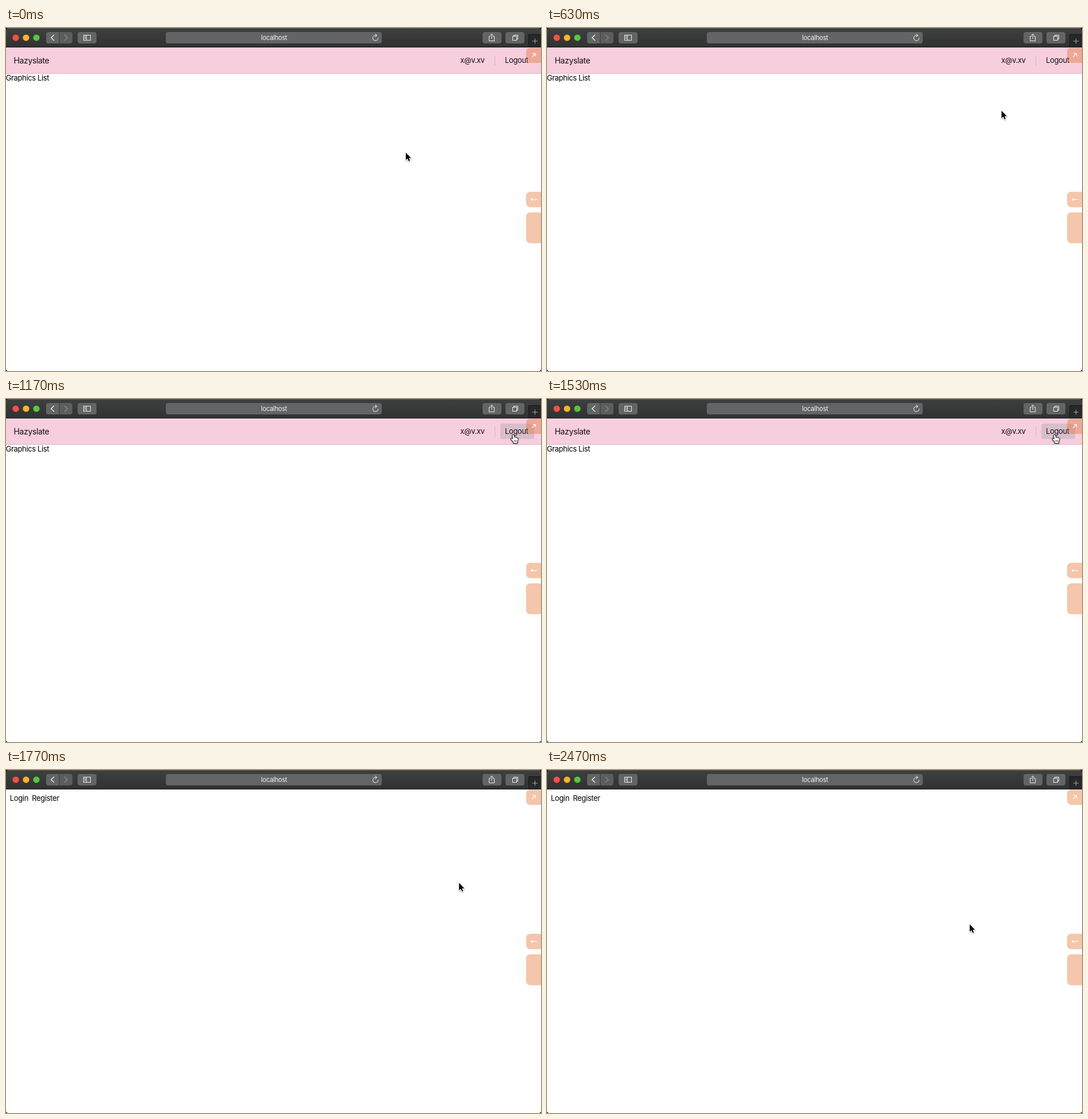
Write an HTML page with a canvas that moves like this. It is 934 px wide and 600 px high and loops after 2510 ms.

```html
<!DOCTYPE html>
<html lang="en">
<head>
<meta charset="utf-8">
<title>Logout</title>
<style>
  html, body { margin: 0; width: 100%; height: 100%; overflow: hidden; background: #fff; }
  canvas { display: block; }
</style>
</head>
<body>
<canvas id="stage" width="934" height="600"></canvas>
<script>
const ctx = document.getElementById('stage').getContext('2d');
const W = 934, H = 600, LOOP = 2510, LOGOUT_AT = 1570, LEAVE_AT = 1600;
const FONT = 'Inter, "Liberation Sans", sans-serif';

function box(x, y, w, h, r, fill) {
  ctx.beginPath();
  ctx.roundRect(x, y, w, h, r);
  ctx.fillStyle = fill;
  ctx.fill();
}

function line(points, color, width = 1) {
  ctx.beginPath();
  points.forEach(([x, y]) => ctx.lineTo(x, y));
  ctx.strokeStyle = color;
  ctx.lineWidth = width;
  ctx.stroke();
}

function frameRect(x, y, w, h, color) {
  ctx.strokeStyle = color;
  ctx.lineWidth = 1;
  ctx.strokeRect(x, y, w, h);
}

function dot(x, y, r, fill) {
  ctx.beginPath();
  ctx.arc(x, y, r, 0, Math.PI * 2);
  ctx.fillStyle = fill;
  ctx.fill();
}

function label(str, x, y, size = 13, color = '#111', spacing = -0.36, align = 'left') {
  ctx.font = `${size}px ${FONT}`;
  ctx.letterSpacing = spacing + 'px';
  ctx.textAlign = align;
  ctx.fillStyle = color;
  ctx.fillText(str, x, y);
}

function toolbar() {
  const grad = ctx.createLinearGradient(0, 0, 0, 34);
  grad.addColorStop(0, '#3e4040');
  grad.addColorStop(1, '#303231');
  ctx.fillStyle = grad;
  ctx.fillRect(0, 0, W, 34);
  ctx.fillStyle = '#595b5b';
  ctx.fillRect(4, 0, W - 8, 1);
  ctx.fillStyle = '#131414';
  ctx.fillRect(0, 33, W, 1);

  ['#fb4d48', '#fbb32c', '#57c640'].forEach((c, i) => dot(17 + 18 * i, 17, 5.6, c));

  const key = '#636565', ink = '#eeeeee';
  box(70, 7, 22.5, 20, [4, 0, 0, 4], key);
  box(93.5, 7, 22.5, 20, [0, 4, 4, 0], '#5c5e5e');
  box(125, 7, 33, 20, 4, key);
  box(279, 7, 377, 20, 4, '#626465');
  box(832, 7, 33, 20, 4, key);
  box(872, 7, 33, 20, 4, key);

  line([[84, 12], [78.7, 17], [84, 22]], ink, 1.4);
  line([[102, 12], [107.2, 17], [102, 22]], '#878989', 1.4);

  // sidebar
  frameRect(135.5, 12.5, 12, 9, ink);
  line([[140.5, 12.5], [140.5, 21.5]], ink);
  for (const y of [14.5, 16.5, 18.5]) line([[137, y], [139, y]], ink);

  // reload
  ctx.beginPath();
  ctx.arc(645, 17.5, 4.6, -0.1, Math.PI * 1.6);
  ctx.strokeStyle = '#dddddd';
  ctx.lineWidth = 1.1;
  ctx.stroke();
  line([[644.5, 10.3], [647.5, 13], [644.5, 15.6]], '#dddddd', 1.1);

  // share
  line([[846, 14.5], [843.5, 14.5], [843.5, 22.5], [852.5, 22.5], [852.5, 14.5], [850, 14.5]], ink);
  line([[848, 19], [848, 10.5]], ink);
  line([[845.5, 13], [848, 10.5], [850.5, 13]], ink);

  // tab overview
  frameRect(884.5, 14.5, 7, 7, ink);
  line([[886.5, 14], [886.5, 12.5], [893.5, 12.5], [893.5, 19.5], [892, 19.5]], ink);

  // new tab
  ctx.fillStyle = '#272929';
  ctx.fillRect(913, 11, 21, 22);
  line([[934, 11.5], [912.5, 11.5], [912.5, 33]], '#151616');
  line([[919, 23], [928, 23]], '#a5a7a7');
  line([[923.5, 18.5], [923.5, 27.5]], '#a5a7a7');

  label('localhost', 468, 21, 11.2, '#f2f2f2', -0.25, 'center');
}

function dashboard(hover) {
  ctx.fillStyle = '#f7cede';
  ctx.fillRect(0, 34, W, 45);
  ctx.fillStyle = '#d6b4c1';
  ctx.fillRect(0, 79, W, 1);
  ctx.fillRect(853, 48, 1, 18);
  if (hover) box(863, 43, 59, 27, 3, '#d9bdcb');
  label('Hazyslate', 13.5, 62, 14);
  label('x@v.xv', 793, 61.3);
  label('Logout', 871, 61.3);
  label('Graphics List', -0.3, 91.7, 13, '#000');
}

function welcome() {
  label('Login', 6.8, 54, 13, '#000');
  label('Register', 45.3, 54, 13, '#000');
}

function sideTabs() {
  const tint = 'rgba(227,112,45,0.4)', round = [7, 0, 0, 7];
  box(908, 34.5, 26, 26.5, round, tint);
  box(908, 286.5, 26, 27, round, tint);
  box(908, 322.5, 26, 54, round, tint);
  line([[918.3, 50.7], [924.3, 44.7]], '#fff', 1.2);
  line([[919.5, 44.6], [924.5, 44.6], [924.5, 49.5]], '#fff', 1.2);
  line([[917, 300], [927, 300]], '#fff', 1.2);
  line([[919, 298], [916.6, 300], [919, 302]], '#fff', 1.2);
}

function corners() {
  const r = 4;
  ctx.beginPath();
  ctx.rect(0, 0, W, H);
  ctx.roundRect(0, 0, W, H, r);
  ctx.fillStyle = '#000';
  ctx.fill('evenodd');
}

const arrowShape = new Path2D('M0 0V13L3 10.2L5.1 15L7.2 14.1L5.2 9.4H9.2Z');
const handShape = new Path2D(
  'M-1.6 .6C-1.6 -1.2 .6 -1.2 .9 .5L1.7 4.2C2.3 3.2 3.8 3.3 4 4.5' +
  'C4.6 3.7 5.9 4 6.1 5.1C6.9 4.5 8 5.1 8 6.3C8 8.4 7.4 9.6 6.6 11.2V13.4H.3V11.8' +
  'C-1 10.3 -2.4 8.6 -3.7 7.2C-4.6 6 -3.3 4.8 -2 5.9L-.5 7Z');

function shape(path, x, y, fill, stroke, width) {
  ctx.save();
  ctx.translate(x, y);
  ctx.lineJoin = 'round';
  ctx.shadowColor = 'rgba(0,0,0,0.35)';
  ctx.shadowBlur = 2.5;
  ctx.shadowOffsetY = 1;
  ctx.strokeStyle = stroke;
  ctx.lineWidth = width;
  ctx.stroke(path);
  ctx.shadowColor = 'transparent';
  ctx.fillStyle = fill;
  ctx.fill(path);
  ctx.restore();
}

function hand(x, y) {
  shape(handShape, x, y, '#fff', '#111', 2);
  for (const i of [0, 1, 2]) {
    line([[x + 1.6 + 1.8 * i, y + 8.2], [x + 1.7 + 1.8 * i, y + 11.3]], '#333', 0.8);
  }
}

const smooth = u => u * u * (3 - 2 * u);
const easeOut = u => 1 - (1 - u) ** 3;

// start ms, end ms, end x, end y, easing
const moves = [
  [20, 340, 689, 243, smooth],
  [370, 860, 879.5, 64, smooth],
  [920, 1230, 886.5, 63.5, smooth],
  [LEAVE_AT - 20, 2230, 739, 270.5, easeOut],
  [2470, 2470, 738, 270, smooth]
];

function pointer(t) {
  let x = 698, y = 218;
  for (const [start, end, tx, ty, ease] of moves) {
    if (t < start) break;
    const k = t >= end ? 1 : ease((t - start) / (end - start));
    x += (tx - x) * k;
    y += (ty - y) * k;
  }
  return [x, y];
}

function draw(t) {
  const [x, y] = pointer(t);
  const loggedIn = t < LOGOUT_AT;
  const hover = loggedIn && x > 863 && y < 70;
  ctx.fillStyle = '#fff';
  ctx.fillRect(0, 0, W, H);
  toolbar();
  if (loggedIn) dashboard(hover);
  else welcome();
  sideTabs();
  corners();
  if (hover || (!loggedIn && t < LEAVE_AT)) hand(x, y);
  else shape(arrowShape, x, y, '#000', '#fff', 2);
}

const begin = performance.now();
function tick() {
  draw((performance.now() - begin) % LOOP);
  requestAnimationFrame(tick);
}
tick();
</script>
</body>
</html>
```
